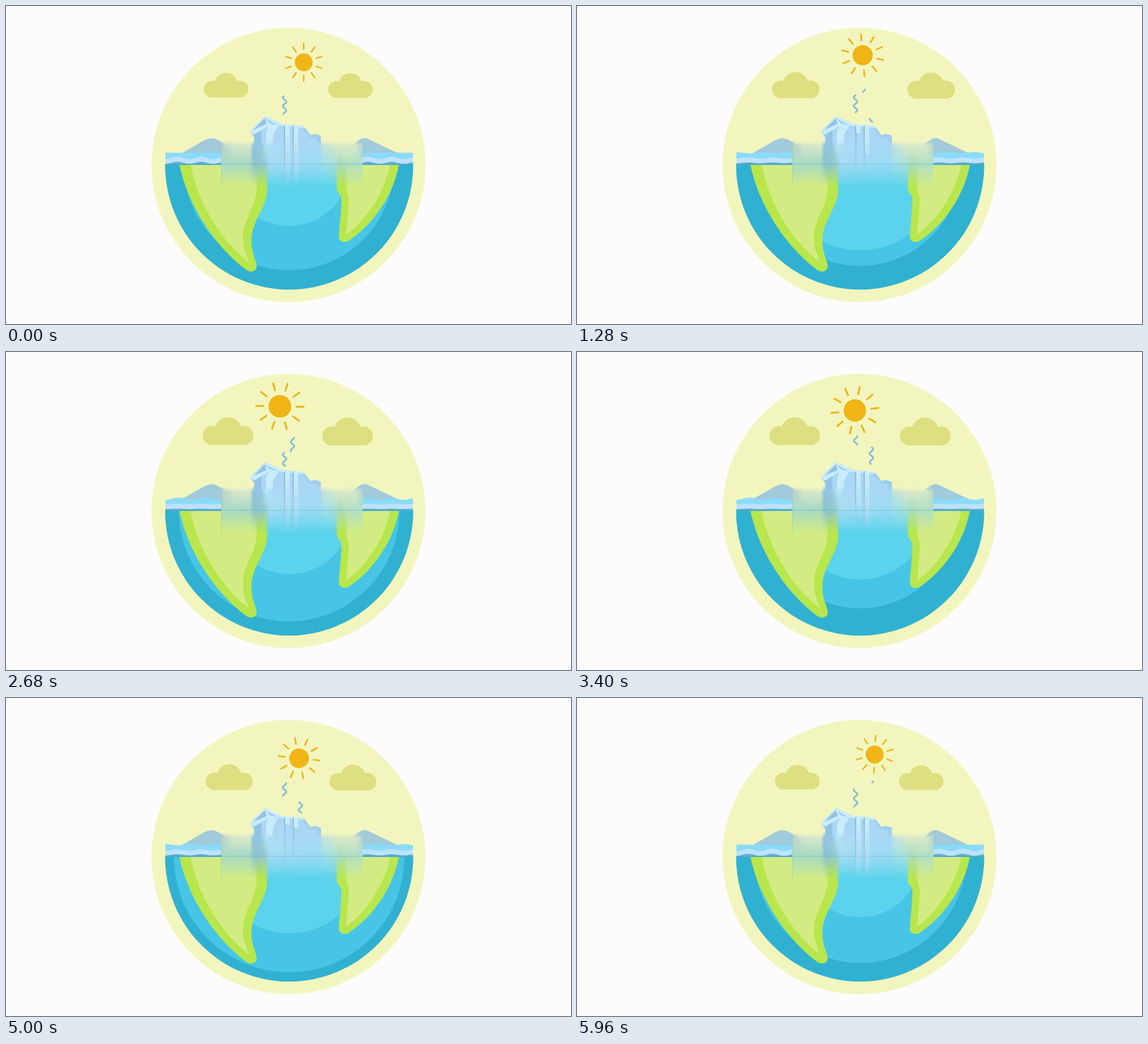
Animation of 854x480 px, one loop 6 s. Source, as an HTML page:

```html
<!DOCTYPE html>
<html lang="en">
<head>
<meta charset="utf-8">
<title>Melting ice</title>
<style>
html, body { margin: 0; width: 100%; height: 100%; overflow: hidden; background: #fcfcfc; }
svg { display: block; width: 854px; height: 480px; }
</style>
</head>
<body>
<svg viewBox="0 0 854 480">
  <defs>
    <clipPath id="half"><rect x="230" y="239" width="400" height="200"/></clipPath>
    <linearGradient id="hazeTop" gradientUnits="userSpaceOnUse" x1="325" x2="539"></linearGradient>
    <linearGradient id="hazeMid" gradientUnits="userSpaceOnUse" x1="325" x2="539"></linearGradient>
    <linearGradient id="hazeLow" gradientUnits="userSpaceOnUse" x1="325" x2="539"></linearGradient>
    <linearGradient id="fadeTop" x2="0" y2="1">
      <stop stop-color="#000"/><stop offset=".11" stop-color="#fff"/>
    </linearGradient>
    <linearGradient id="fadeMid" x2="0" y2="1">
      <stop offset=".06" stop-color="#000"/><stop offset=".48" stop-color="#fff"/>
    </linearGradient>
    <linearGradient id="fadeLow" x2="0" y2="1">
      <stop offset=".48" stop-color="#000"/><stop offset=".97" stop-color="#fff"/>
    </linearGradient>
    <linearGradient id="drip" gradientUnits="userSpaceOnUse" x1="0" x2="0" y1="180" y2="272">
      <stop stop-color="#cdeffd"/><stop offset=".3" stop-color="#c6eafc" stop-opacity=".85"/>
      <stop offset="1" stop-color="#bfe8fb" stop-opacity="0"/>
    </linearGradient>
    <linearGradient id="shade" gradientUnits="userSpaceOnUse" x1="0" x2="0" y1="180" y2="270">
      <stop stop-color="#86bbdc"/><stop offset=".35" stop-color="#8fc4e4" stop-opacity=".75"/>
      <stop offset="1" stop-color="#8fc4e4" stop-opacity="0"/>
    </linearGradient>
    <mask id="mTop"><rect x="325" y="203" width="214" height="72" fill="url(#fadeTop)"/></mask>
    <mask id="mMid"><rect x="325" y="203" width="214" height="72" fill="url(#fadeMid)"/></mask>
    <mask id="mLow"><rect x="325" y="203" width="214" height="72" fill="url(#fadeLow)"/></mask>
  </defs>

  <circle cx="427" cy="240" r="207" fill="#f2f6be"/>
  <g id="sun"></g>
  <g fill="#dedf80">
    <g id="cloudL"></g>
    <g id="cloudR"></g>
  </g>
  <g id="steam" fill="none" stroke="#86bdd4" stroke-width="2.6" stroke-linecap="round"></g>

  <g fill="#a1cada">
    <path d="M264 223L299 203Q311 196 322 203L352 223Z"/>
    <path d="M594 223L549 201.500Q542 197 534 202L506 223Z"/>
  </g>

  <g clip-path="url(#half)">
    <circle cx="428" cy="240.500" r="187.500" fill="#30b1d2"/>
    <circle id="mid" cx="428" cy="240" fill="#46c5e6"/>
    <circle id="inner" cx="428" cy="240" fill="#5cd3ec"/>
  </g>
  <g fill="#b8e64c">
    <path d="M262 239H395V274C395 306 371 322 371 355C371 374 379 386 379 393C379 400 371 403 364 399C314 362 274 299 262 239Z"/>
    <path d="M500 239H594C585 288 553 331 520 353C513 359 503 356 503 348C504 329 507 310 507 291C507 283 500 284 500 273Z"/>
  </g>
  <g fill="#d2ec83">
    <path d="M279 239H379V272C379 304 358 320 358 351C358 368 366 380 367 387C322 352 289 294 279 239Z"/>
    <path d="M515 239H581C573 279 546 323 514 345C515 329 518 310 518 290C518 284 514 282 514 272Z"/>
  </g>

  <path id="back" fill="#8adbfa"/>
  <path d="M241 232H615V240H241Z" fill="#5fb0d0"/>
  <path id="front" fill="#bfe2fc"/>
  <path d="M241 239H615" stroke="#4ba9c8" stroke-width="1.300"/>

  <path d="M369 190L373 184L392 166L417 178L449 181L453 185L460 195L467 193L476 196V242H372L375 198Z" fill="#abd7f5"/>
  <path d="M449 181L453 185L460 195L467 193L476 196V242H470V200L458 198L447 184Z" fill="#a0cfef"/>
  <path d="M372 187L391 170L396 177L376 189Z" fill="#94c2e1"/>
  <path d="M373 194L386 186V242H373L376 199Z" fill="#94c4e4"/>
  <path d="M369 190L373 184L392 166L417 178L449 181L451 184L424 182L412 180L404 193L400 242H393V191L397 181L375 194Z M374 187L394 178L391 169Z" fill="#c9ecfd" fill-rule="evenodd"/>
  <path d="M391 169L399 177L411 180L394 171Z" fill="#9ccbea"/>

  <g mask="url(#mTop)"><rect x="325" y="203" width="214" height="72" fill="url(#hazeTop)"/></g>
  <g mask="url(#mMid)"><rect x="325" y="203" width="214" height="72" fill="url(#hazeMid)"/></g>
  <g mask="url(#mLow)"><rect x="325" y="203" width="214" height="72" fill="url(#hazeLow)"/></g>
  <path d="M325 238.800H538" stroke="#58aebd" stroke-opacity=".4" stroke-width="1.300"/>
  <path d="M325.500 207V275" stroke="#8dbfae" stroke-opacity=".35"/>
  <g id="drips"></g>
</svg>

<script>
const LOOP = 6000, STEP = 40;
const $ = id => document.getElementById(id);

function add(parent, tag, attrs) {
  const el = document.createElementNS('http://www.w3.org/2000/svg', tag);
  for (const k in attrs) el.setAttribute(k, attrs[k]);
  return parent.appendChild(el);
}

// horizontal colour runs of the soft band over the ice
function fillStops(id, stops) {
  for (const [x, color] of stops)
    add($(id), 'stop', { offset: (x - 325) / 214, 'stop-color': color });
}
fillStops('hazeTop', [[325, '#b4d0ce'], [343, '#dae7c8'], [369, '#dfebc9'], [373, '#95c5e2'],
  [386, '#97c8e6'], [393, '#bce4f8'], [402, '#b0dbf6'], [474, '#a9d8f3'], [479, '#c9e4da'],
  [502, '#dfecc8'], [528, '#dcebc8'], [539, '#b7d3d0']]);
fillStops('hazeMid', [[325, '#a9dac6'], [368, '#a8d9c4'], [375, '#8ac3cd'], [391, '#93cbd0'],
  [398, '#a6dcf3'], [472, '#9bdaf3'], [482, '#a3e0e6'], [499, '#abdfd4'], [504, '#a8dbbb'],
  [516, '#b4dfc2'], [539, '#b0dfcb']]);
fillStops('hazeLow', [[325, '#d2ec83'], [376, '#d2ec83'], [381, '#b8e64c'], [392, '#b8e64c'],
  [397, '#5cd3ec'], [498, '#5cd3ec'], [502, '#b8e64c'], [512, '#b8e64c'], [517, '#d2ec83'], [539, '#d2ec83']]);

// sun
for (let i = 0; i < 10; i++)
  add($('sun'), 'path', { d: 'M0-19.800V-28.300', stroke: '#edb51c', 'stroke-width': 2.3,
    'stroke-linecap': 'round', transform: `rotate(${i * 36})` });
add($('sun'), 'circle', { r: 13.5, fill: '#f0b516' });

// clouds
for (const id of ['cloudL', 'cloudR']) {
  for (const [cx, cy, r] of [[-21, 5.5, 12.7], [0, -1, 18], [21, 5.5, 12.7]])
    add($(id), 'circle', { cx, cy, r });
  add($(id), 'rect', { x: -21, y: 5, width: 42, height: 13 });
}

// piecewise linear [time, value] table
function lerp(table, t) {
  let i = 1;
  while (i < table.length - 1 && t > table[i][0]) i++;
  const [a, u] = table[i - 1], [b, v] = table[i];
  return u + (v - u) * Math.min(1, (t - a) / (b - a));
}

const TIMES = [0, 680, 1840, 2680, 4120, 5000];
const keyed = values => [...TIMES.map((t, i) => [t, values[i]]), [LOOP, values[0]]];

// smooth closed curve through values at TIMES
function smooth(values, t) {
  const n = TIMES.length;
  const at = i => TIMES[(i + n) % n] + LOOP * Math.floor(i / n);
  const val = i => values[(i + n) % n];
  const slope = i => (val(i + 1) - val(i - 1)) / (at(i + 1) - at(i - 1));
  let i = 0;
  while (i < n - 1 && t >= at(i + 1)) i++;
  const h = at(i + 1) - at(i), s = (t - at(i)) / h, r = 1 - s;
  return val(i) * (1 + 2 * s) * r * r + slope(i) * h * s * r * r
    + val(i + 1) * s * s * (3 - 2 * s) - slope(i + 1) * h * s * s * r;
}

const SUN_X = [450, 442.4, 422.2, 414, 429.3, 443];
const SUN_Y = [85, 76, 75, 82, 93, 91];
const DRIFT_L = [[0, 332.7], [.25, 325.7], [.75, 339.7], [1, 332.7]];
const DRIFT_R = [[0, 520.7], [.39, 537], [.868, 515.3], [1, 520.7]];
const MID = [[0, 159], [.25, 136.5], [.72, 179], [1, 159]];
const INNER = [[0, 92], [.471, 132.5], [.965, 89], [1, 92]];
const BACK_AMP = keyed([0, .3, -2.2, 1.8, 1.8, -1]);
const FRONT_AMP = keyed([2, 1.6, .2, .3, .3, 1.1]);

// start times of each rising wisp
const RISE = 1210;
const WISPS = [
  { x: 421, starts: [-625, 620, 2370, 4100, 5375] },
  { x: 433, starts: [110, 1815, 3620] },
  { x: 445, starts: [1215, 2950, 4770] }
];
for (const w of WISPS) w.el = add($('steam'), 'path', {});

const DRIPS = [
  { x: 421, ends: keyed([272, 191, 195, 272, 196, 192]) },
  { x: 434, ends: keyed([272, 197, 250, 272, 250, 197]) }
];
for (const d of DRIPS) {
  add($('drips'), 'rect', { x: d.x - .5, y: 181, width: 2, height: 88, fill: 'url(#shade)' });
  d.shadow = add($('drips'), 'rect', { x: d.x - 1, y: 180, width: 7, rx: 3.5, fill: 'url(#shade)' });
  d.el = add($('drips'), 'rect', { x: d.x + 1, y: 179, width: 6.5, rx: 3.2, fill: 'url(#drip)' });
}

function wave(y, amp, length) {
  let d = '';
  for (let x = 241; x <= 615; x += 2)
    d += `L${x} ${(y + amp * Math.cos((x - 241) / length * 2 * Math.PI)).toFixed(2)}`;
  return d;
}

function wispPath(x, u) {
  const head = 176 - 50 * (1 - (1 - u) ** 2.2), tail = 176 - 50 * u * u;
  let d = '';
  for (let y = head; y <= tail; y += .8) {
    const dx = 2.6 * Math.cos((y - 132 + 14 * (u - .5)) / 13 * 2 * Math.PI);
    d += `${d ? 'L' : 'M'}${(x + dx).toFixed(2)} ${y.toFixed(2)}`;
  }
  return d;
}

function draw(t) {
  const p = t % 3000 / 3000;
  const swell = 1 - Math.abs(t / 3000 - 1);

  $('sun').setAttribute('transform', `translate(${smooth(SUN_X, t)} ${smooth(SUN_Y, t)})
    rotate(${-t * .06}) scale(${1 + .3 * swell})`);
  const size = 1 + .155 * swell;
  $('cloudL').setAttribute('transform', `translate(${lerp(DRIFT_L, p)} 120) scale(${size})`);
  $('cloudR').setAttribute('transform', `translate(${lerp(DRIFT_R, p)} 120.500) scale(${size})`);
  $('mid').setAttribute('r', lerp(MID, p));
  $('inner').setAttribute('r', lerp(INNER, p));

  const back = lerp(BACK_AMP, t), front = lerp(FRONT_AMP, t);
  $('back').setAttribute('d', 'M241 235' + wave(221.5, back, 40) + 'L615 235Z');
  $('front').setAttribute('d', 'M241 232' + wave(229.5, front, 36) + 'L615 236'
    + wave(236.7, front * .8, 36).split('L').reverse().filter(Boolean).map(s => 'L' + s).join('') + 'Z');

  for (const w of WISPS) {
    const start = w.starts.find(s => t > s && t < s + RISE);
    w.el.setAttribute('d', start === undefined ? '' : wispPath(w.x, (t - start) / RISE));
  }
  for (const d of DRIPS) {
    const end = lerp(d.ends, t);
    d.el.setAttribute('height', end - 179);
    d.shadow.setAttribute('height', end - 179);
  }
}

const begin = performance.now();
function tick() {
  const t = (performance.now() - begin) % LOOP;
  draw(Math.floor(t / STEP) * STEP);
  requestAnimationFrame(tick);
}
tick();
</script>
</body>
</html>
```
